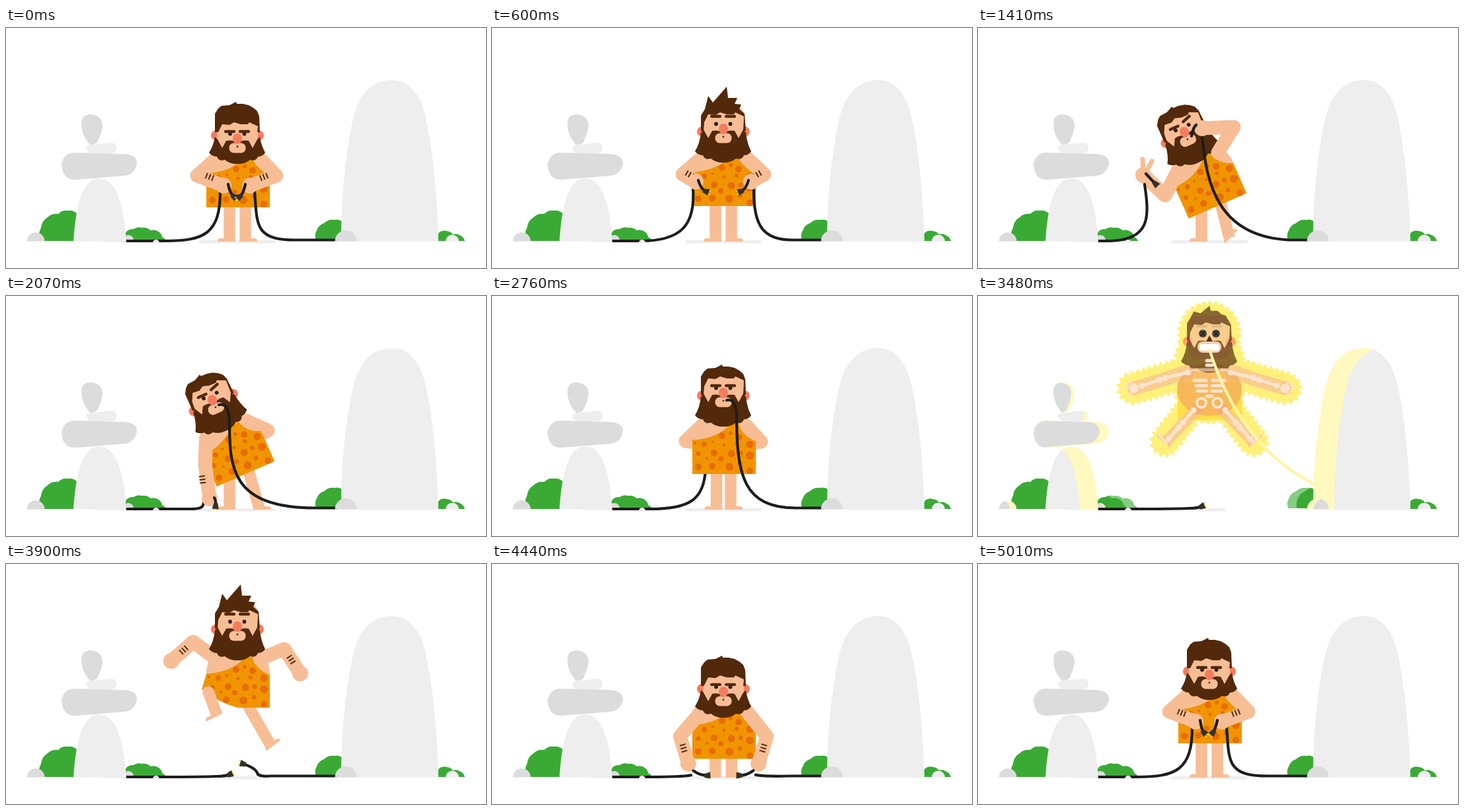
Animation, 726 px wide and 364 px high, one loop 5040 ms. Source, as an HTML page with a canvas:

```html
<!DOCTYPE html>
<html>
<head>
<meta charset="utf-8">
<style>
html, body { margin: 0; width: 100%; height: 100%; overflow: hidden; background: #fff; }
canvas { display: block; }
</style>
</head>
<body>
<canvas id="stage" width="726" height="364"></canvas>
<script>
const ctx = document.getElementById('stage').getContext('2d');
const LOOP = 5040, TAU = Math.PI * 2;
const SKIN = '#f7be96', HAIR = '#52290a', CORAL = '#f47d5f', CLOTH = '#f09400', SPOT = '#e86c08',
  CABLE = '#1d1d1b', GREEN = '#3aaa35', PALE = '#fff9c0', GLOW = '#fff07a', BONE = '#fde3d0',
  GREY = '#dcdcdc', LIGHT = '#eeeeee';

// ---------- drawing helpers ----------
function fill(path, color) { ctx.fillStyle = color; ctx.fill(path); }
function line(d, width, color, cap = 'round') {
  Object.assign(ctx, { lineWidth: width, strokeStyle: color, lineCap: cap, lineJoin: 'round' });
  ctx.stroke(new Path2D(d));
}
function dot(x, y, r, color, ry = r) {
  ctx.fillStyle = color;
  ctx.beginPath(); ctx.ellipse(x, y, r, ry, 0, 0, TAU); ctx.fill();
}
function pill(x, y, w, h, r, color) {
  ctx.fillStyle = color;
  ctx.beginPath(); ctx.roundRect(x, y, w, h, r); ctx.fill();
}
function group(x, y, angle, draw) {
  ctx.save(); ctx.translate(x, y); ctx.rotate(angle); draw(); ctx.restore();
}
const dome = (x, y, r) => new Path2D(`M${x - r} ${y}a${r} ${r} 0 0 1 ${2 * r} 0z`);
function bush(...p) {
  let d = `M${p[0]} ${p[1]}`;
  for (let i = 2; i < p.length; i += 2) {
    const dx = p[i] - p[i - 2], dy = p[i + 1] - p[i - 1];
    d += `Q${p[i - 2] + dx / 2 + dy * .25} ${p[i - 1] + dy / 2 - dx * .25} ${p[i]} ${p[i + 1]}`;
  }
  return new Path2D(d + 'z');
}

// ---------- scenery: path, colour, lit edge shift ----------
const bushes = [
  [bush(52, 323, 53, 303, 63, 287, 79, 282, 93, 277, 108, 282, 108, 323), GREEN, 0],
  [bush(181, 323, 182, 309, 193, 305, 205, 303, 219, 307, 231, 309, 236, 317, 242, 323), GREEN, -16],
  [bush(469, 322, 470, 307, 481, 296, 497, 291, 508, 293, 508, 322), GREEN, 14],
  [bush(654, 323, 655, 310, 667, 308, 676, 313, 686, 314, 694, 323), GREEN, 0],
  [dome(185, 322, 8), GREY, -4]
];
const rocks = [
  [dome(45, 323.5, 13.5), GREY, -10],
  [new Path2D('M102 323Q108 228 141 228Q176 228 182 325Z'), LIGHT, -28],
  [new Path2D('M121 181Q124 177 130 177L160 174Q167 175 167 181Q167 190 159 190L130 191Q122 188 121 181Z'), LIGHT, -6],
  [new Path2D('M84 208Q86 190 103 189L178 191Q198 192 198 205Q196 221 180 224L106 230Q86 231 84 208Z'), GREY, -14],
  [new Path2D('M114 145Q114 131 128 131Q146 133 146 148Q146 156 140 169Q137 178 127 177Q114 163 114 145Z'), GREY, -5],
  [new Path2D('M507 324Q506 232 524 142Q538 79 584 79Q620 79 634 132Q651 210 654 324Z'), LIGHT, 32],
  [dome(514, 323.5, 16.5), GREY, 10],
  [dome(675, 323.5, 10), LIGHT, 0],
  [dome(227, 326, 5), LIGHT, 0]
];
function scenery(list, lit) {
  for (const [path, color, shift] of list) {
    if (!lit || !shift) { fill(path, color); continue; }
    ctx.save();
    ctx.clip(path);
    fill(path, color === GREEN ? '#86cc82' : PALE);
    ctx.translate(shift, 0);
    fill(path, color);
    ctx.restore();
  }
}

// ---------- poses ----------
// body: dx dy turn | head: dy, face dy, spikes | brow: left dy, right dy, right tilt
// arm: elbow, hand, stripe offset, stripes shown | leg: hip, ankle, foot turn
// cable: ground x, two controls, end | tip: quadratic curve
const stand = {
  body: [0, 2, 0], head: [6, 13, 0], brow: [0, 0, 0], hem: [0, 0],
  armL: [289, 224, 329, 239, -5, 1], armR: [409, 224, 369, 239, 5, 1], zL: 1, zR: 1,
  legL: [338, 258, 338, 324, 0], legR: [362, 258, 362, 324, 0], knee: 0, fingers: [0],
  cableL: [240, 300, 323, 324, 312, 324, 248], tipL: [336, 237, 339, 252, 345, 256],
  cableR: [440, 376, 322, 380, 300, 376, 248], tipR: [362, 237, 359, 252, 353, 256],
  plug: [1, 1]
};
const apart = { ...stand, tipL: [336, 237, 338, 252, 342, 256], tipR: [362, 237, 359, 251, 355, 256] };
const wide = { ...stand, tipL: [335, 237, 337, 247, 339, 254], tipR: [363, 237, 361, 247, 359, 254] };
const startle = {
  ...stand, body: [0, 0, 0], head: [6, 0, 1], brow: [-8, -8, 0],
  armL: [288, 222, 308, 233, -5, 1], armR: [412, 222, 392, 233, 5, 1],
  cableL: [225, 285, 323, 308, 300, 304, 243], tipL: [312, 231, 316, 245, 324, 248],
  cableR: [455, 410, 322, 395, 300, 396, 243], tipR: [388, 231, 384, 245, 376, 248]
};
const lean = {
  ...stand, body: [11.5, 0, -.414], head: [0, 0, 0], brow: [-1, -6, -.32],
  armL: [283, 254, 250, 223, 0, 0], armR: [387, 150, 339, 152, 0, 0], zR: 2,
  legR: [366, 262, 380, 320, -.8], fingers: [1],
  cableL: [200, 262, 321, 259, 285, 252, 237], tipL: [254, 221, 262, 230, 269, 237],
  cableR: [470, 365, 316, 345, 240, 339, 162], tipR: [330, 147, 325, 151, 323, 164],
  plug: [1, 0]
};
const bite = {
  ...lean, armR: [396, 204, 372, 216, 0, 0], zR: 0, legR: [366, 262, 383, 324, 0],
  cableR: [470, 340, 322, 338, 260, 338, 190], tipR: [338, 190, 337, 161, 322, 165]
};
const stoop = {
  ...bite, armL: [301, 255, 308, 307, 7, 1], fingers: [0],
  cableL: [280, 295, 323, 299, 320, 299, 312], tipL: [315, 306, 318, 310, 317, 319]
};
const behind = {
  ...stand, body: [0, 0, 0], head: [0, 0, 0],
  armL: [293, 220, 322, 224, 0, 0], armR: [407, 221, 380, 224, 0, 0], zL: 0, zR: 0,
  legL: [339.5, 258, 339.5, 324, 0], legR: [361, 258, 361, 324, 0],
  cableL: [240, 300, 323, 321, 308, 323, 262], tipL: [323, 262, 324, 250, 332, 245],
  cableR: [460, 380, 322, 371, 270, 370, 190], tipR: [370, 190, 371, 154, 355, 158],
  plug: [1, 0]
};
const grounded = {
  cableL: [240, 260, 323, 300, 323, 318, 322], tipL: [318, 322, 332, 322, 339, 319],
  cableR: [400, 395, 322, 385, 322, 381, 319], tipR: [381, 319, 378, 309, 358, 303], plug: [1, 1]
};
const shock = {
  ...behind, ...grounded, body: [0, -82, 0], head: [0, 0, .35], brow: [-8, -8, 0],
  armL: [283, 126, 236, 140, 0, 0], armR: [417, 126, 464, 140, 0, 0], zL: 1, zR: 1,
  legL: [331, 172, 283, 224, .74], legR: [369, 172, 417, 224, -.74]
};
const leap = {
  ...shock, body: [0, -52, 0], head: [0, 0, 1], hem: [-7, -28],
  armL: [283, 118, 250, 147, 0, 1], armR: [421, 129, 445, 166, 0, 1],
  legL: [306, 194, 319, 231, -.45], legR: [362, 208, 401, 278, -.65], knee: 1
};
const land = {
  ...stand, ...grounded, body: [0, 14, 0], head: [6, 0, 1], brow: [-8, -8, 0],
  armL: [283, 236, 272, 268, 0, 1], armR: [417, 236, 428, 268, 0, 1],
  legL: [336, 268, 336, 324, 0], legR: [364, 268, 364, 324, 0],
  tipR: [381, 320, 370, 321, 360, 319]
};
const rise = { ...land, body: [0, 2, 0], head: [6, 6, 0], brow: [0, 0, 0],
  armL: [286, 226, 280, 258, 0, 1], armR: [414, 226, 420, 258, 0, 1] };
const crouch = {
  ...stand, body: [0, 30, 0], head: [10, 13, 0],
  armL: [284, 268, 300, 311, 0, 1], armR: [416, 268, 400, 311, 0, 1],
  legL: [338, 285, 338, 324, 0], legR: [362, 285, 362, 324, 0],
  cableL: [240, 260, 323, 285, 323, 298, 320], tipL: [302, 312, 312, 321, 324, 321],
  cableR: [460, 440, 322, 415, 322, 402, 320], tipR: [398, 312, 388, 321, 376, 321]
};
const keys = [
  [0, stand], [120, stand], [240, startle], [960, startle], [1350, lean], [1470, lean],
  [1650, { ...bite, fingers: [0] }], [1720, bite], [1980, stoop], [2220, stoop], [2460, behind],
  [2900, behind], [3030, shock], [3840, shock], [3900, leap], [3990, land], [4110, land],
  [4320, rise], [4480, crouch], [4560, crouch], [4770, wide], [4880, wide], [5010, apart], [LOOP, stand]
];
function poseAt(t) {
  const i = keys.findIndex(k => k[0] > t), [t0, a] = keys[i - 1], [t1, b] = keys[i];
  const u = (t - t0) / (t1 - t0), k = u * u * (3 - 2 * u), pose = {};
  for (const name in a) {
    pose[name] = Array.isArray(a[name])
      ? a[name].map((v, j) => v + (b[name][j] - v) * k)
      : (k < .5 ? a : b)[name];
  }
  return pose;
}

// ---------- figure ----------
const calm = [316, 150, 316, 122, 321, 114, 326, 110, 338, 109, 348, 104, 349, 107,
  358, 107, 367, 109, 374, 113, 380, 118, 383, 126, 384, 150];
const spiky = [316, 150, 316, 127, 322, 117, 327, 97, 334, 107, 355, 83, 357, 100,
  371, 100, 367, 109, 377, 110, 374, 117, 382, 124, 384, 150];
const spots = [[307, 223, 2], [321, 225, 4], [334, 221, 2], [348, 212, 5], [361, 208, 3], [373, 214, 5],
  [351, 226, 2.5], [370, 224, 3], [390, 225, 5.5], [312, 239, 3.5], [336, 238, 5], [325, 246, 2],
  [346, 247, 4], [362, 239, 5.5], [376, 238, 3.5], [390, 242, 6], [312, 259, 5], [333, 258, 5],
  [359, 259, 6], [375, 254, 3.5], [390, 265, 5]];

const inBody = (p, draw) =>
  group(351 + p.body[0], 270 + p.body[1], p.body[2], () => { ctx.translate(-351, -270); draw(); });

function leg([hx, hy, ax, ay, turn], side) {
  line(`M${hx} ${hy}L${ax} ${ay - 2}`, 17.5, SKIN, 'butt');
  dot(hx, hy, 8.7, SKIN);
  group(ax, ay, turn, () => pill(side < 0 ? -18 : -9, -5, 27, 5, [4, 4, 1, 1], SKIN));
}
function arm(p, side) {
  const [ex, ey, hx, hy, off, marked] = side < 0 ? p.armL : p.armR;
  const [dx, dy, turn] = p.body, x = side * 33, c = Math.cos(turn), s = Math.sin(turn);
  const sx = 351 + dx + x * c + 74 * s, sy = 270 + dy + x * s - 74 * c;
  line(`M${sx} ${sy}L${ex} ${ey}L${hx} ${hy}`, 21, SKIN);
  if (marked > .5) {
    group(ex + (hx - ex) * .43, ey + (hy - ey) * .43, Math.atan2(hy - ey, hx - ex), () => {
      for (const k of [-5, 0, 5]) line(`M${k} ${off - 4.5}V${off + 4.5}`, 2, HAIR, 'butt');
    });
  }
}
function hand(p, side) {
  const [, , x, y] = side < 0 ? p.armL : p.armR;
  dot(x, y, 12, SKIN);
  if (side < 0 && p.fingers[0] > .1) {
    const k = p.fingers[0];
    line(`M${x} ${y - 4}L${x - k} ${y - 4 - 20 * k}M${x + 4} ${y - 4}L${x + 4 + 9 * k} ${y - 4 - 17 * k}`, 7, SKIN);
  }
}
function cable([gx, ...c], edge, y) {
  line(`M${edge} ${y}L${gx} ${y}C${c}`, 4.2, CABLE);
}
function tip([x, y, cx, cy, ex, ey], size) {
  line(`M${x} ${y}Q${cx} ${cy} ${ex} ${ey}`, 4.2, CABLE);
  if (size < .1) return;
  group(ex, ey, Math.atan2(ey - cy, ex - cx), () => {
    ctx.scale(size, size);
    line('M4 -2.5H7M4 2.5H7', 1.6, '#ffe11f', 'butt');
    fill(new Path2D('M-5 -3L4 -5V5L-5 3Z'), '#33302d');
  });
}
function torso({ hem: [a, b] }) {
  fill(new Path2D('M303 238V215Q305 190 325 180H376Q397 190 399 215V238Z'), SKIN);
  const cloth = new Path2D(`M303 218Q340 217 362 193H373Q378 212 399 220V270H351
    Q325 ${270 + b * .2} ${303 + a} ${270 + b}Z`);
  ctx.save();
  ctx.clip(cloth);
  fill(cloth, CLOTH);
  for (const [x, y, r] of spots) dot(x, y, r, SPOT);
  ctx.restore();
}
function head(p, skull) {
  const [dy, f, spikes] = p.head, [bl, br, tilt] = p.brow;
  ctx.translate(0, dy);
  dot(317.5, 151 + f * .3, 7.5, CORAL);
  dot(382.5, 151 + f * .3, 7.5, CORAL);
  pill(319, 112, 62, 66, 14, SKIN);
  fill(new Path2D(`M316 ${153 + f * .3}Q314 170 307 181Q312 187 319 187Q322 195 331 192Q340 199 350 198
    Q360 199 369 192Q378 195 381 187Q388 187 392 181Q386 170 384 ${153 + f * .3}
    L380 ${148 + f}L373 ${161 + f}L367 ${150 + f}Q358 ${148 + f} 350 ${153 + f}
    Q342 ${148 + f} 333 ${150 + f}L327 ${161 + f}L320 ${148 + f}Z`), HAIR);

  let d = '';
  for (let i = 0; i < calm.length; i++) d += (i ? ' ' : 'M') + (calm[i] + (spiky[i] - calm[i]) * spikes);
  const fringe = [381, 128, 368, 122, 366, 125, 355, 125, 345, 122, 338, 126, 327, 125, 321, 137];
  d += 'L380 150L' + fringe.map((v, i) => i % 2 ? v + f : v).join(' ') + 'L320 150Z';
  fill(new Path2D(d), HAIR);

  ctx.translate(0, f);
  if (skull) {
    line('M332 128H345M355 128H368', 4, '#d9b08e');
    return;
  }
  pill(337.5, 153.5, 25, 15, 7, SKIN);
  dot(350, 159, 1.4, HAIR);
  dot(350, 147, 7, CORAL, 8);
  dot(339, 139.5, 2.9, '#2b1c12');
  dot(360.5, 139.5, 2.9, '#2b1c12');
  group(338.5, 136 + bl, 0, () => pill(-8.5, -2.2, 17, 4.4, 2, HAIR));
  group(360.5, 136 + br, tilt, () => pill(-8.5, -2.2, 17, 4.4, 2, HAIR));
}
function man(p) {
  if (!p.zL) { cable(p.cableL, 180, 323); tip(p.tipL, p.plug[0]); }
  if (!p.knee) leg(p.legL, -1);
  leg(p.legR, 1);
  if (!p.zL) arm(p, -1);
  if (!p.zR) arm(p, 1);
  inBody(p, () => torso(p));
  if (p.knee) leg(p.legL, -1);
  if (p.zL) arm(p, -1);
  if (p.zR === 1) arm(p, 1);
  inBody(p, () => head(p));
  if (p.zL) cable(p.cableL, 180, 323);
  cable(p.cableR, 500, 321.5);
  if (p.zR === 2) arm(p, 1);
  if (p.zL) { hand(p, -1); tip(p.tipL, p.plug[0]); }
  if (p.zR) hand(p, 1);
  tip(p.tipR, p.plug[1]);
}

// ---------- electrified figure ----------
// Capsule outline with pointed teeth
function burst(x1, y1, x2, y2, r) {
  const len = Math.hypot(x2 - x1, y2 - y1), half = len + Math.PI * r;
  const n = Math.round(half / 4.5) * 2;
  group(x1, y1, Math.atan2(y2 - y1, x2 - x1), () => {
    ctx.beginPath();
    for (let i = 0; i < n; i++) {
      const far = i >= n / 2, s = (i % (n / 2)) * 2 * half / n, R = r + (i % 2 ? 6 : 0);
      const a = Math.max(0, (s - len) / r) - Math.PI / 2;
      const x = Math.min(s, len) + R * Math.cos(a), y = R * Math.sin(a);
      ctx.lineTo(far ? len - x : x, far ? -y : y);
    }
    ctx.fillStyle = GLOW;
    ctx.fill();
  });
}
function bone(x1, y1, x2, y2) {
  line(`M${x1} ${y1}L${x2} ${y2}`, 5, BONE);
  dot(x1, y1, 4.5, BONE);
  dot(x2, y2, 4.5, BONE);
}
function skeleton() {
  for (const s of [-1, 1]) {
    ctx.save();
    ctx.translate(350, 0);
    ctx.scale(s, 1);
    bone(32, 116, 67, 124);
    bone(75, 127, 102, 136);
    dot(114, 140, 7, BONE);
    line('M114 140L121 128M114 140L128 133M114 140L130 141M114 140L122 152', 2.2, BONE);
    bone(24, 173, 40, 192);
    bone(46, 199, 62, 217);
    line('M64 224L76 211', 3, BONE);
    line('M5 128H23M4 136H20M4 144H18', 5, BONE);
    ctx.lineWidth = 4;
    ctx.beginPath(); ctx.arc(12, 162, 7, 0, TAU); ctx.stroke();
    dot(10, 57, 6, '#4a4540');
    line('M7 54L13 60M13 54L7 60', 1.5, '#1d1d1b');
    ctx.restore();
  }
  line('M346 98H354M346 105H354M346 152H354', 5, BONE);
  line('M324 112H376', 5, 'rgba(253,227,208,.6)');
  fill(new Path2D('M350 60L355 69H345Z'), '#5a2a1a');
  pill(332, 69, 36, 17, 8, '#f5d0b4');
  pill(335, 73, 30, 10, 4, '#fff');
}
function electrified(p, t) {
  cable(p.cableL, 180, 323);
  tip(p.tipL, 1);
  ctx.save();
  ctx.translate(0, p.body[1] + 82 + 3 * Math.sin((t - 3480) / 60));
  burst(350, 56, 350, 59, 44);
  burst(350, 100, 350, 140, 50);
  for (const s of [-1, 1]) {
    burst(350 + s * 30, 115, 350 + s * 115, 140, 21);
    burst(350 + s * 24, 165, 350 + s * 67, 221, 19);
  }
  ctx.fillStyle = '#ffe04a';
  ctx.fillRect(302, 130, 97, 58);
  ctx.globalAlpha = .68;
  leg(shock.legL, -1);
  leg(shock.legR, 1);
  arm(shock, -1);
  arm(shock, 1);
  dot(350, 142, 49, '#f3a562', 40);
  inBody(shock, () => head(shock, true));
  ctx.globalAlpha = 1;
  skeleton();
  line('M350 81C366 132 406 235 512 287', 4.2, '#fff5a6');
  ctx.restore();
}

// ---------- loop ----------
function draw(t) {
  const p = poseAt(t), live = t >= 2940 && t < 3870;
  ctx.clearRect(0, 0, 726, 364);
  const w = 58 * Math.min(1, 1 + p.body[1] / 140);
  pill(350 - w, 322, w * 2, 4.5, 2, LIGHT);
  scenery(bushes, live);
  if (live) electrified(p, t); else man(p);
  scenery(rocks, live);
}
const start = performance.now();
function tick() {
  const t = (performance.now() - start) % LOOP;
  draw(Math.floor(t / 30) * 30);
  requestAnimationFrame(tick);
}
tick();
</script>
</body>
</html>
```
